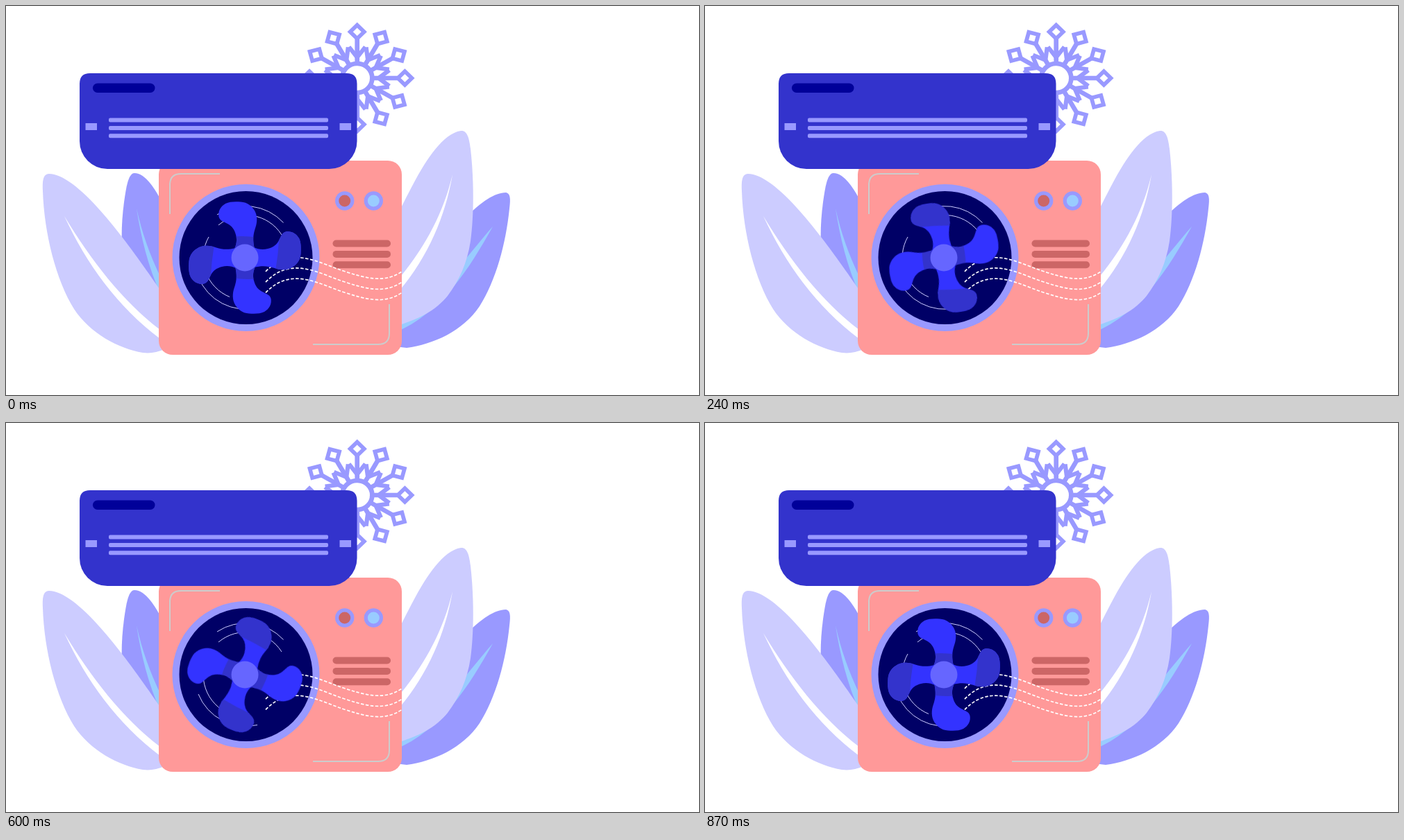
Animation, 998 px wide and 561 px high, one loop 0.9 s. Source, as an HTML page:

```html
<!DOCTYPE html>
<html lang="en">
<head>
<meta charset="utf-8">
<title>Air conditioner</title>
<style>
  html, body { margin: 0; width: 100%; height: 100%; overflow: hidden; background: #fff; }
  svg { display: block; width: 100%; height: 100%; }
</style>
</head>
<body>
<svg viewBox="0 0 998 561" fill="none">
  <defs>
    <path id="blade" d="M-15-13C-12-19-11-26-13-33C-15-41-19-46-25-49C-30-52-36-53-37.5-59C-39-67-35-74-28-78C-22-81-14-81-6-80.5C4-80 11-74 15-66C19-57 17-48 14.5-41C12-33 11-25 14-13Z"/>
    <clipPath id="bladeClip"><use href="#blade"/></clipPath>
    <g id="bright">
      <use href="#blade" fill="#33f"/>
      <path d="M-30-29Q0-34 30-27V0H-30Z" fill="#33c" clip-path="url(#bladeClip)"/>
    </g>
    <g id="dark">
      <use href="#blade" fill="#33f"/>
      <path d="M-45-51L-25-49Q-6-48 12-45L30-42V-90H-45Z" fill="#33c" clip-path="url(#bladeClip)"/>
    </g>
    <g id="arm" stroke="#99f">
      <path d="M0-19V-57" stroke-width="6.5"/>
      <path d="M-11.500-45L0-30L11.500-45" stroke-width="6"/>
      <path d="M0-76.500L9.800-66.700L0-56.900L-9.800-66.700Z" stroke-width="5.6"/>
    </g>
    <path id="breeze" d="M374 383C410 345 450 370 484 381.500S545 400 570 383" stroke="#fff" stroke-width="1.7" stroke-dasharray="4.5 2.5"/>
  </defs>

  <g id="snow" transform="translate(505.700 104) scale(1.030 1)">
    <circle r="21" stroke="#99f" stroke-width="6.5"/>
  </g>

  <!-- leaves -->
  <path d="M185 241C176 241 173 262 170 283C167 306 166 325 167 350L222 420V278C210 256 198 241 185 241Z" fill="#99f"/>
  <path d="M188 292C196 328 207 358 222 390V414C205 377 194 332 188 292Z" fill="#9cf"/>
  <path d="M62 242C54 242 52 251 53 267C55 328 72 395 98 437C121 472 162 494 197 500Q213 502 228 495V418C184 354 108 243 62 242Z" fill="#ccf"/>
  <path d="M84 303C122 366 167 425 222 467V480C160 433 116 372 84 303Z" fill="#fff"/>
  <path d="M720 269C726 270 727 277 725 292C720 343 705 397 682 433C658 469 615 488 577 493L560 491V440L664 303C684 283 704 269 720 269Z" fill="#99f"/>
  <path d="M701 318C667 379 627 443 560 471V450C632 412 662 362 701 318Z" fill="#9cf"/>
  <path d="M655 180C664 179 667 190 669 206C674 250 674 302 669 339C664 371 653 395 636 418C618 440 594 452 560 462V308C579 274 615 186 655 180Z" fill="#ccf"/>
  <path d="M643 243C630 298 604 349 560 400V418C604 369 632 308 643 243Z" fill="#fff"/>

  <!-- outdoor unit -->
  <rect x="220" y="223" width="350" height="280" rx="20" fill="#f99"/>
  <path d="M236 300V258Q236 242 252 242H308M442 488H536Q552 488 552 472V430" stroke="#ccc" stroke-width="2"/>
  <circle cx="345.5" cy="363" r="106" fill="#99f"/>
  <circle cx="345.5" cy="363" r="96" fill="#006"/>
  <path d="M304 301A74 74 0 0 1 399.500 312.500M306 316A61 61 0 0 1 397 330M277 391A74 74 0 0 0 362 435.500M292 333A61 61 0 0 0 322 419.500" stroke="#ccf" stroke-width="1"/>
  <g id="panel"></g>
  <g id="wind">
    <use href="#breeze"/>
    <use href="#breeze" y="15.2"/>
    <use href="#breeze" y="30.4"/>
  </g>

  <g transform="translate(344 363)">
    <g id="fan">
      <use href="#bright"/>
      <use href="#dark" transform="rotate(90)"/>
      <use href="#bright" transform="rotate(180)"/>
      <use href="#dark" transform="rotate(270)"/>
    </g>
    <circle r="19.5" fill="#66f"/>
  </g>

  <!-- indoor unit -->
  <path d="M121 97H490.500Q505.500 97 505.500 112V195A40 40 0 0 1 465.500 235H146A40 40 0 0 1 106 195V112Q106 97 121 97Z" fill="#33c"/>
  <g id="vents"></g>
</svg>
<script>
  const $ = id => document.getElementById(id);

  function add(parent, tag, attrs) {
    const el = document.createElementNS('http://www.w3.org/2000/svg', tag);
    for (const key in attrs) el.setAttribute(key, attrs[key]);
    parent.append(el);
  }
  const bar = (parent, x, y, width, height, rx, fill) =>
    add(parent, 'rect', { x, y, width, height, rx, fill });

  for (let a = 0; a < 360; a += 30) {
    add($('snow'), 'use', { href: '#arm', transform: `rotate(${a})` });
  }

  for (const [cx, fill] of [[487.7, '#c66'], [529.3, '#9cf']]) {
    add($('panel'), 'circle', { cx, cy: 281, r: 13.7, fill: '#99f' });
    add($('panel'), 'circle', { cx, cy: 281, r: 8.5, fill });
  }
  for (let i = 0; i < 3; i++) {
    bar($('panel'), 470.5, 337.5 + 15.4 * i, 83.5, 10, 5, '#c66');
    bar($('vents'), 148, 161.5 + 11.4 * i, 316, 6, 2, '#99f');
  }
  bar($('vents'), 125, 111.5, 89.5, 13.5, 6.7, '#009');
  bar($('vents'), 114.5, 169, 16.5, 10, 0, '#99f');
  bar($('vents'), 480.5, 169, 16.5, 10, 0, '#99f');

  // One turn in 30 held poses; the last pose equals the first.
  $('fan').animate(
    [{ transform: 'rotate(0deg)' }, { transform: 'rotate(-360deg)' }],
    { duration: 900, iterations: Infinity, easing: 'steps(30, jump-none)' }
  );
</script>
</body>
</html>
```
